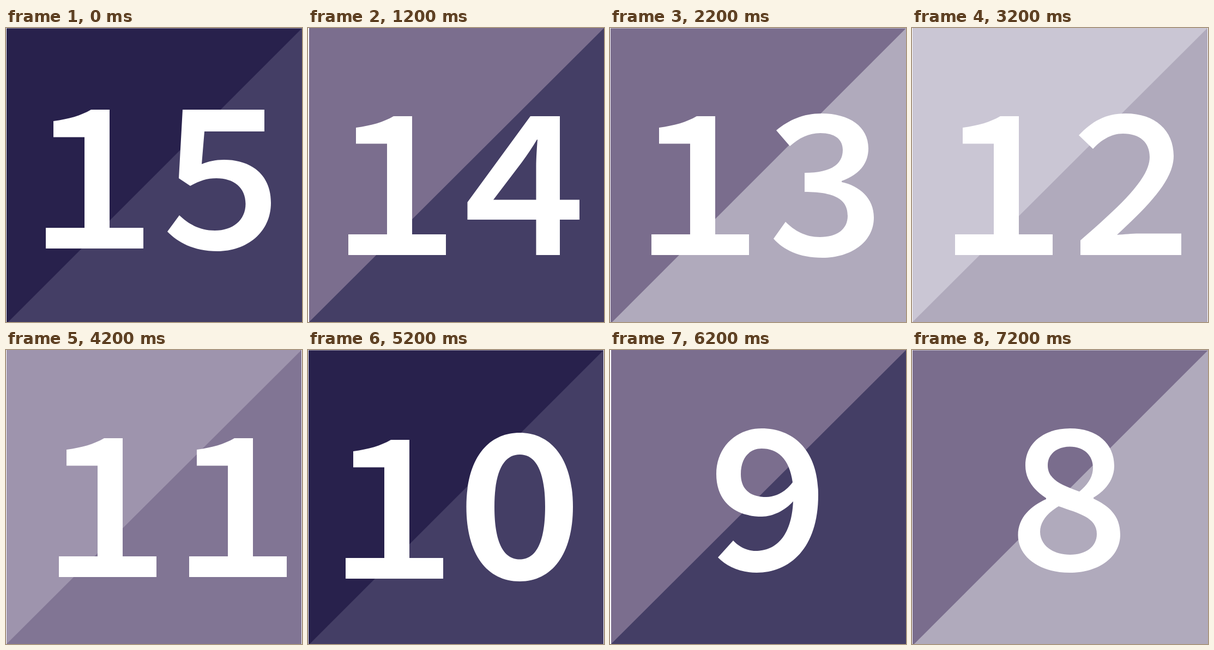
An HTML page for the animation above (8000 ms loop, 543x540 px).

```html
<!DOCTYPE html>
<html lang="en">
<head>
<meta charset="utf-8">
<title>Countdown</title>
<style>
  html, body { margin: 0; width: 100%; height: 100%; overflow: hidden; background: #fff; }
  svg { display: block; width: 100%; height: 100%; }
</style>
</head>
<body>
<svg viewBox="0 0 543 540" role="img">
  <path id="upper"/>
  <path id="lower"/>
  <path id="first" fill="#fff"/>
  <path id="second" fill="#fff" fill-rule="evenodd"/>
</svg>
<script>
const LOOP = 8000;

// The "1" is drawn from its own top left corner, the other digits in stage coordinates.
const digits = {
  0: 'M388.5 152C447 152 486 201 486 288C486 376 447 425 388.5 425C329 425 290.5 376 290.5 288C290.5 201 329 152 388.5 152Z' +
     'M388.5 192C361 192 342 219 342 288C342 358 361 384.5 388.5 384.5C416 384.5 435 358 435 288C435 219 416 192 388.5 192Z',
  1: 'M0 255H179V217H117V0H83C64 11 43 17 14 21V50.5H71V217H0Z',
  2: 'M309 417V390C390 320 436 274 436 237C436 210 418 194 387 194C364 194 346 207 332 222L306 197' +
     'C330 172 354 157 392 157C446 157 480 188 480 235C480 280 433 327 376 380C390 379 402 377.5 418 377.5H494V417Z',
  3: 'M300 387L322 356C338 372 358 384 385 384C416 384 436 370 436 345C436 318 418 301 357 301V266' +
     'C409 266 427 248 427 224C427 204 412 193 386 193C364 193 347 202 330 217L305 188C328 169 354 157 388 157' +
     'C439 157 474 181 474 221C474 250 456 270 425 281V283C458 290 484 313 484 348C484 394 441 422 390 422C346 422 318 407 300 387Z',
  4: 'M408 162H462V315.5H498V352H462V417H418.5V352H292.5V320Z' +
     'M340 315.5H418.5V255C418.5 240 420 218 421 205H420C411 220 402 233 392 247Z',
  5: 'M324 150H474V190H364L359 250C371 245 384 242 400 242C447 242 486 267 486 321C486 376 441 410 388 410' +
     'C343 410 315 393 296 374L318 344C334 359 354 372 383 372C416 372 439.5 353 439.5 323C439.5 293 418 276 386 276' +
     'C368 276 357 280 338 290L317 276Z',
  8: 'M290 144C340 144 371 172 371 213C371 240 352 260 333 271V273C360 286 382 303 382 339C382 379 345 409 289 409' +
     'C234 409 194.5 380 194.5 340C194.5 307 219 286 246 274V272C226 259 208 240 208 212C208 171 242 144 290 144Z' +
     'M307 260C324 246 332 232 332 216C332 194 316 177.5 289.5 177.5C266 177.5 249 191 249 212C249 239 277 249 307 260Z' +
     'M290 376C319 376 339 361 339 338C339 307 305 300 269 287C249 299 235 315 235 334C235 359 259 376 290 376Z',
  9: 'M278 144C338 144 382 186 382 266C382 365 329 409 269 409C238 409 214 397 198 381L226 350C236 361 251 369 267 369' +
     'C303 369 333 344 336 278C321 295 298 306 279 306C230 306 195 279 195 228C195 177 233 144 278 144Z' +
     'M278 181C256 181 240 198 240 228C240 256 257 270 287 270C302 270 321 262 335 243C329 199 307 181 278 181Z'
};

const navy = ['#28214c', '#443e65'];
const dusk = ['#7b6e8e', '#443e65'];
const mauve = ['#7a6d8d', '#b0aabc'];
const pale = ['#cac6d4', '#b0aabc'];
const plum = ['#9e94ad', '#817594'];

// box: left, top, right, and where the diagonal meets the bottom edge
const cards = [
  { label: 15, colors: navy, box: [1, .5, 543, 4], one: [73, 150] },
  { label: 14, colors: dusk, box: [2, 0, 543, 2], one: [74, 162] },
  { label: 13, colors: mauve, box: [1, .5, 543, 4], one: [76, 162] },
  { label: 12, colors: pale, box: [1, 0, 542, 1], one: [79, 162] },
  { label: 11, colors: plum, box: [1, 0, 542, 1], one: [97, 162] },
  { label: 10, colors: navy, box: [1, .5, 542, 3], one: [69, 165] },
  { label: 9, colors: dusk, box: [2, 0, 543, 2] },
  { label: 8, colors: mauve, box: [1, .5, 543, 4] }
];

const svg = document.querySelector('svg');
const [upper, lower, first, second] = svg.querySelectorAll('path');
let shown;

function setAttributes(element, attributes) {
  for (const name in attributes) element.setAttribute(name, attributes[name]);
}

function show({ label, colors, box: [left, top, right, foot], one }) {
  setAttributes(svg, { 'aria-label': label });
  setAttributes(upper, { d: `M${left} ${top}H${right}V540H${left}Z`, fill: colors[0] });
  setAttributes(lower, { d: `M${right} ${top}V540H${foot}Z`, fill: colors[1] });
  setAttributes(first, {
    d: one ? digits[1] : '',
    transform: one ? `translate(${one})` : ''
  });
  setAttributes(second, {
    d: digits[label % 10],
    transform: label === 11 ? 'translate(336,162)' : ''
  });
}

function draw() {
  const time = performance.now() % LOOP;
  const index = Math.max(0, Math.floor((time - 200) / 1000));
  if (index !== shown) show(cards[shown = index]);
  requestAnimationFrame(draw);
}
draw();
</script>
</body>
</html>
```
